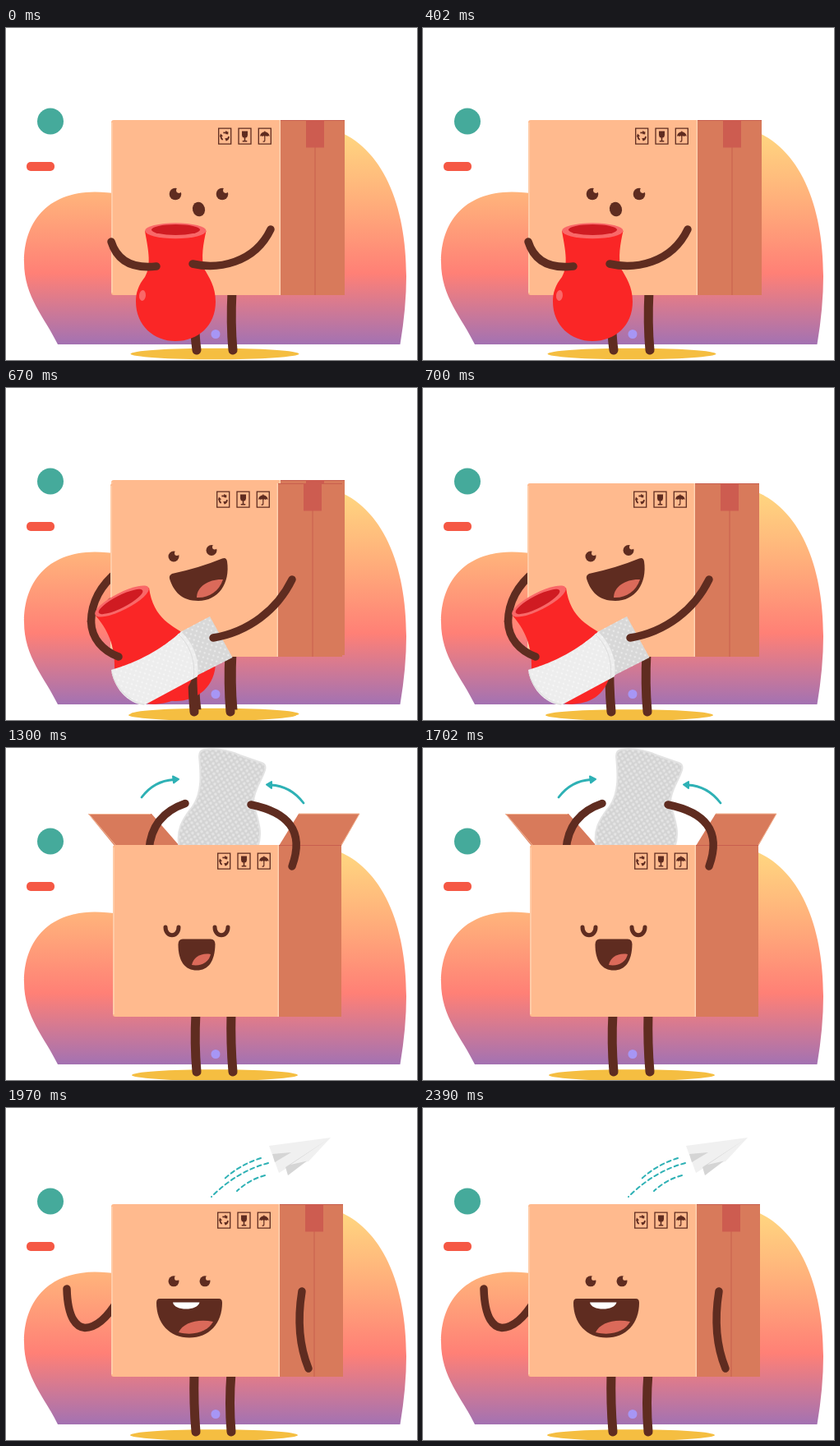
These frames come from a looping animation (500 by 404 pixels, 2.67 s). An HTML page:

```html
<!DOCTYPE html>
<html lang="en">
<head>
<meta charset="utf-8">
<title>Packing box</title>
<style>
  html, body { margin: 0; width: 100%; height: 100%; overflow: hidden; background: #fff; }
  svg { display: block; width: 500px; height: 404px; }
  .limb { fill: none; stroke: #5f2c20; stroke-width: 9.5; stroke-linecap: round; }
  .leg { stroke-width: 11; }
  .dark { fill: #5f2c20; }
  .skin { fill: #ffba8e; }
  .side { fill: #d87a5b; }
  .tongue { fill: #db6a5a; }
  .red { fill: #fa2626; }
  .rim { fill: #f96868; }
  .hole { fill: #d01b22; }
  .teal { fill: none; stroke: #2eb1b5; stroke-linecap: round; stroke-linejoin: round; }
</style>
</head>
<body>
<svg id="stage" viewBox="0 0 500 404"></svg>
<script>
const path = (cls, d) => `<path class="${cls}" d="${d}"/>`;
const fill = (color, d) => `<path fill="${color}" d="${d}"/>`;
const limb = d => path('limb', d);
const leg = d => path('limb leg', d);
const shadow = (x, y, rx) => `<ellipse cx="${x}" cy="${y}" rx="${rx}" ry="6.8" fill="#f5be41"/>`;
const eye = (x, y, r) => `<circle class="dark" cx="${x}" cy="${y}" r="${r}"/>
  <circle class="skin" cx="${x + r * .6}" cy="${y - r * .6}" r="${r * .45}"/>`;
const oval = (cls, x, y, rx, ry, turn = 0) =>
  `<ellipse class="${cls}" rx="${rx}" ry="${ry}" transform="translate(${x} ${y}) rotate(${turn})"/>`;

// Front face from left to edge, side face from edge to right.
function box(left, edge, right, top, bottom, iconX, taped = true) {
  const mid = edge + 42, tape = mid - 11;
  return fill('#ffba8e', `M${left + 3} ${top}H${edge}V${bottom}H${left + 3}q-3 0-3-3V${top + 3}q0-3 3-3`)
    + path('side', `M${edge} ${top}H${right}V${bottom}H${edge}z`)
    + `<path d="M${left + 1} ${top + 3}V${bottom - 3}M${edge - .7} ${top}V${bottom}" stroke="#ffd3b3" stroke-width="1.4"/>
      <path d="M${edge} ${top + .5}H${right}${taped ? `M${mid} ${top + 33}V${bottom}` : ''}" stroke="#c85f4e"/>`
    + (taped ? fill('#cd5c50', `M${tape} ${top}h22v33.500h-22z`) : '')
    + `<use href="#icons" x="${iconX}" y="${top + 9.5}"/>`;
}

const defs = `<defs>
  <linearGradient id="sunset" gradientUnits="userSpaceOnUse" x1="0" y1="130" x2="0" y2="385">
    <stop offset="0" stop-color="#ffd580"/><stop offset=".3" stop-color="#ffb17b"/>
    <stop offset=".66" stop-color="#ff8076"/><stop offset="1" stop-color="#a372b2"/>
  </linearGradient>
  <pattern id="bubbles" width="7" height="8" patternUnits="userSpaceOnUse" patternTransform="rotate(12)">
    <g fill="#e5e5e5"><circle cx="2" cy="2" r="1.8"/><circle cx="5.500" cy="6" r="1.8"/></g>
  </pattern>
  <pattern id="sheen" width="8" height="8" patternUnits="userSpaceOnUse" patternTransform="rotate(-28)">
    <g fill="#fff" opacity=".45"><circle cx="2" cy="2" r="1.2"/><circle cx="6" cy="6" r="1.2"/></g>
  </pattern>
  <g id="icons">
    <path d="M.7 .7h15v19h-15zM25 .7h15v19h-15zM49.300 .7h15v19h-15z" fill="none" stroke="#5f2c20" stroke-width="1.3"/>
    <circle cx="8.200" cy="10.500" r="4.700" fill="none" stroke="#5f2c20" stroke-width="1.800" stroke-dasharray="6 3.840"/>
    <path class="dark" d="M9 3.500l4 2-3.500 2.500zM12 12l-1.500 4-2.500-3zM2 11l1-4 3 3z"/>
    <path class="dark" d="M29 4h7v5q0 2.500-2.700 3v3.500h2v1.500h-5.600v-1.500h2v-3.500q-2.700-.5-2.700-3z"/>
    <path class="dark" d="M51 10.500a5.800 5.800 0 0 1 11.600 0q-1.500-1.300-3 0-1.400-1.300-2.800 0-1.400-1.300-2.900 0-1.500-1.300-2.900 0z"/>
    <path d="M56.800 4v11q.2 2-2.300 1.500" fill="none" stroke="#5f2c20" stroke-width="1.2"/>
  </g>
</defs>`;

const backdrop = fill('url(#sunset)',
    'M63 385C47 352 22 327 22 285C22 237 49 200 108 199.500Q122 199.500 140 202L400 124C458 145 487 215 487 302Q487 340 479.500 385z')
  + `<circle cx="54" cy="113.500" r="16" fill="#45aa9b"/>
    <rect x="25" y="163" width="34" height="11" rx="5" fill="#f55844"/>`;

const holding = shadow(254, 396.5, 102.5)
  + leg('M230 350Q229 370 232 392') + leg('M275 320Q273 360 276 392')
  + box(128, 334, 412, 112, 325, 258)
  + eye(206, 202, 7.3) + eye(263, 202, 7.3) + oval('dark', 234.5, 220.5, 7.5, 8.8, -15)
  + path('red', 'M169 247C172 265 178 288 169 303C161 313 158 322 158 333C158 362 180 381 206 381C234 381 255 362 255 333C255 315 247 303 241 293C237 280 240 262 243.500 247z')
  + oval('rim', 206.3, 246.7, 37.2, 9.5) + oval('hole', 206.5, 245.5, 29.5, 6.5)
  + oval('rim', 166, 325.500, 4, 6.500, 5)
  + limb('M128 260Q139 295 183 290') + limb('M322 245C302 287 257 294 227 287');

const wrapping = shadow(251, 398, 102)
  + leg('M227 322Q226 360 229 394') + leg('M272 322Q270 360 273 394')
  + limb('M136 223C115 240 104 260 103.500 284')
  + box(127, 331, 409, 116, 327, 256)
  + eye(204, 205, 6.5) + eye(250, 197.5, 6.5)
  + path('dark', 'M202 226Q235 219 263 207.500Q268 205.500 269 211C273 238 258 259 234 259C214 259 204 248 199 232Q198 228 202 226z')
  + path('tongue', 'M232 255C232 241 248 232 264 233C259 248 246 256 232 255z')
  + path('red', 'M109 277C123 293 133 313 132 341C140 370 158 387 184 384.500C207 383 222 371 228 348L224 303C203 290 179 281 174 243z')
  + oval('rim', 141, 259.5, 36.5, 10.5, -27) + oval('hole', 139.5, 260, 30, 7.5, -27)
  + ['#d8d8d8', 'url(#sheen)'].map(c => fill(c, 'M212 297L248 278L275.500 328L232 350z')).join('')
  + ['#ededed', 'url(#sheen)'].map(c => fill(c, 'M128 343Q177 329 213 296.500C228 310 236 331 233 351L168 386C148 384 131 365 128 343z')).join('')
  + `<path d="M209 299C224 313 231 333 228 353M129 347C134 366 150 382 168 385" fill="none" stroke="#dcdcdc"/>`
  + limb('M103.500 284C104 305 118 320 137 327') + limb('M348 233C330 270 295 297 252 304');

const vaseInWrap = 'M241 2Q262-1 285 9L311 18Q317 20 315 27C310 42 301 52 301 66C304 84 314 99 306 122H211C206 100 215 86 227 71C239 54 237 31 235 10Q235 3 241 2z';
const packing = shadow(254, 398, 101)
  + leg('M231 322Q229 360 232 394') + leg('M274 322Q273 360 276 394')
  + path('side', 'M100 80H177L211 119H132z') + path('side', 'M356 80H430L408 119H332z')
  + '<path d="M133 118L101 80.500H176M356 80H430L408 118" fill="none" stroke="#f3b593"/>'
  + fill('#d3d3d3', vaseInWrap) + fill('url(#bubbles)', vaseInWrap)
  + `<path d="${vaseInWrap}" fill="none" stroke="#e3e3e3" stroke-width="2"/>`
  + limb('M174 124C176 97 190 77 218 67.500')
  + box(130, 332, 408, 118, 327, 257, false)
  + limb('M298 69C342 78 364 100 348 144')
  + '<path class="limb" style="stroke-width:5" d="M194 218C194 231 210 231 210 218M254 218C254 231 270 231 270 218"/>'
  + path('dark', 'M215 232.500H249Q254.500 232.500 254.500 239C254 260 246 270.500 232 270.500C218 270.500 209.500 260 209.500 239Q209.500 232.500 215 232.500z')
  + path('tongue', 'M226 264C228 254 238 249 249 251C247 260 238 266 226 264z')
  + `<g class="teal" stroke-width="2.800"><path d="M165 60Q180 40 204 38.500M362 67Q346 46 322 45"/>
    <path d="M203 34.500L210 38L204 42.500zM323 41L317 44.500L323 49z" fill="#2eb1b5" stroke-width="2"/></g>`;

const sending = shadow(253, 398, 102)
  + leg('M229 322Q228 360 231 394') + leg('M274 322Q271 360 274 394')
  + limb('M74 220C75 258 87 267 96 267.500Q116 267 136 234')
  + box(128, 333, 410, 117, 327, 257)
  + limb('M360 223C354 260 357 290 368 317')
  + eye(204, 210.8, 6.5) + eye(242, 210.8, 6.5)
  + path('dark', 'M187 232H259Q263 232 263 237C263 262 247 279.500 223 279.500C199 279.500 183 262 183 237Q183 232 187 232z')
  + fill('#fff', 'M203 236.500H235.500C234 242 227 244.500 219 244.500C211 244.500 204 242 203 236.500z')
  + path('tongue', 'M210 273C215 262 232 256 252 260C246 271 230 278 210 273z')
  + fill('#f0f0f0', 'M320 46L395 36L368 65L345 71L332 79z')
  + fill('#d5d5d5', 'M324 56L347 54L327 66zM395 36L340 72L343 82L366 64.500L346 69z')
  + '<path class="teal" stroke-width="2" stroke-dasharray="5 4" d="M310 61Q284 69 265 87M319 67Q281 77 250 108M315 82Q296 87 281 101"/>';

// Each pose: markup, start and end in ms. The first two overlap briefly.
const LOOP = 2670;
const poses = [[holding, 0, 700], [wrapping, 670, 1300], [packing, 1300, 1970], [sending, 1970, LOOP]];

const stage = document.getElementById('stage');
stage.innerHTML = defs + backdrop
  + poses.map(([art]) => `<g class="pose">${art}</g>`).join('')
  + '<circle cx="255" cy="372.500" r="5.500" fill="#a796f5"/>';
const groups = stage.querySelectorAll('.pose');

function draw() {
  const t = performance.now() % LOOP;
  poses.forEach(([, start, end], i) => {
    groups[i].style.display = t >= start && t < end ? '' : 'none';
  });
  requestAnimationFrame(draw);
}
draw();
</script>
</body>
</html>
```
